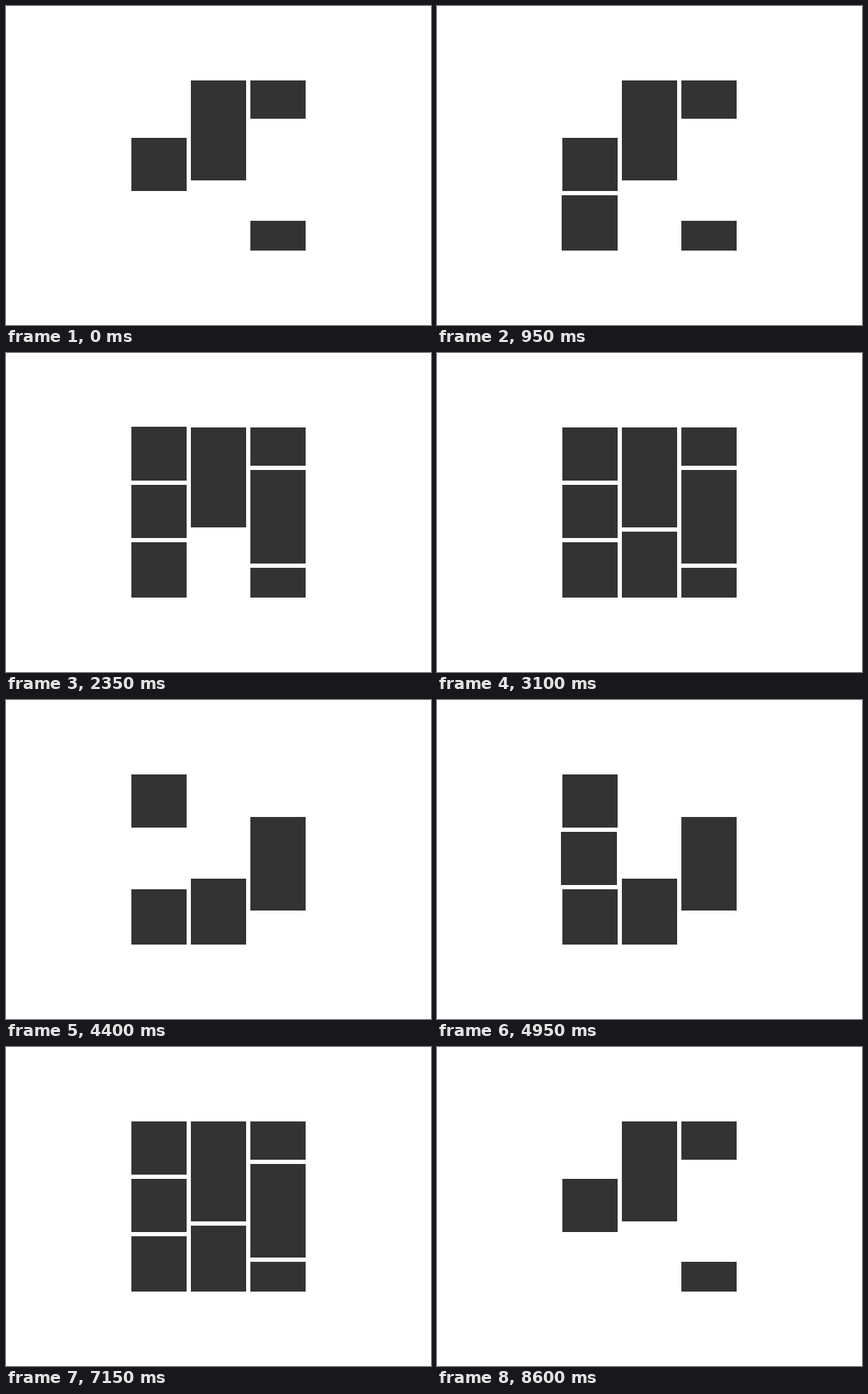
An HTML page with a canvas for the animation above (8.65 s loop, 600 px wide and 450 px high).

```html
<!DOCTYPE html>
<html lang="en">
<head>
<meta charset="utf-8">
<title>Sliding tiles</title>
<style>
  html, body { margin: 0; width: 100%; height: 100%; overflow: hidden; background: #fff; }
  canvas { display: block; }
</style>
</head>
<body>
<canvas id="stage" width="600" height="450"></canvas>
<script>
const ctx = document.getElementById('stage').getContext('2d');

const LOOP = 8650, STEP = 50;
const SLIDE = 545, DIST = 150, BEAT = 695.5;
const LEFT = 177, TOP = 105, WIDTH = 78, GAP = 6;

// each round brings its tiles in one by one; "clear" empties their places
const rounds = [
  { start: 445, clear: 8600, moves: 'a3 left, c2 right, a1 top, b2 bottom' },
  { start: 4500, clear: 4400, moves: 'a2 left, b1 top, c3 bottom, c1 right' }
];
const heights = { a: [75, 75, 78], b: [141, 93], c: [54, 132, 42] };
const sides = { left: [-1, 0], right: [1, 0], top: [0, -1], bottom: [0, 1] };

const sum = list => list.reduce((a, b) => a + b, 0);

const tiles = rounds.flatMap(({ start, clear, moves }) =>
  moves.split(', ').map((move, i) => {
    const [cell, side] = move.split(' ');
    const column = heights[cell[0]], row = cell[1] - 1;
    return {
      x: LEFT + 'abc'.indexOf(cell[0]) * (WIDTH + GAP),
      y: TOP + sum(column.slice(0, row)) + row * GAP,
      h: column[row],
      dir: sides[side],
      start: start + i * BEAT,
      clear
    };
  }));

// cubic-bezier(.7, 0, 0, 1), solved by bisection
function ease(p) {
  if (p >= 1) return 1;
  let lo = 0, hi = 1;
  for (let i = 0; i < 30; i++) {
    const s = (lo + hi) / 2;
    if (2.1 * s * (1 - s) ** 2 + s ** 3 < p) lo = s; else hi = s;
  }
  return lo * lo * (3 - 2 * lo);
}

function drawTile({ x, y, h, dir, start, clear }, t) {
  // time since the places were cleared, and since the slide began
  const age = (t - clear + LOOP) % LOOP;
  const wait = (start - clear + LOOP) % LOOP;
  if (age <= wait) return;
  const d = DIST * (1 - ease((age - wait) / SLIDE));
  const px = x + dir[0] * d, py = y + dir[1] * d;
  // edges grow outwards to whole pixels
  const l = Math.floor(px), u = Math.floor(py);
  ctx.fillRect(l, u, Math.ceil(px + WIDTH) - l, Math.ceil(py + h) - u);
}

function draw(t) {
  ctx.fillStyle = '#fff';
  ctx.fillRect(0, 0, 600, 450);
  ctx.fillStyle = '#333';
  for (const tile of tiles) drawTile(tile, t);
}

ctx.beginPath();
ctx.rect(88, 18, 424, 414);
ctx.clip();

function tick() {
  const t = performance.now() % LOOP;
  draw(Math.floor(t / STEP) * STEP);
  requestAnimationFrame(tick);
}

draw(0);
requestAnimationFrame(tick);
</script>
</body>
</html>
```
